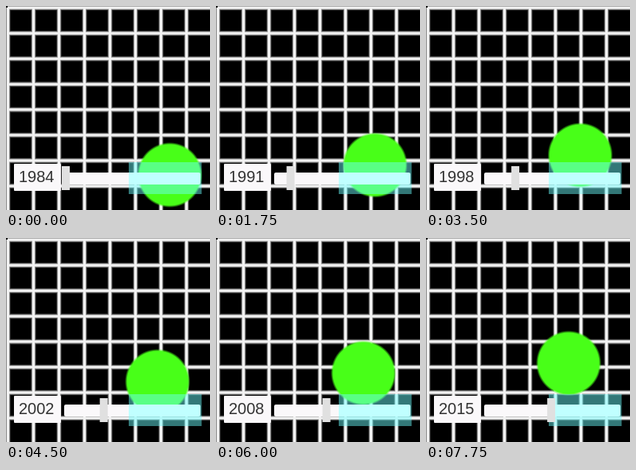
These frames come from a looping animation (256 by 256 pixels, 8000 ms). An HTML page with a canvas:

```html
<!DOCTYPE html>
<html lang="en">
<head>
<meta charset="utf-8">
<title>Year slider</title>
<style>
  html, body { margin: 0; width: 100%; height: 100%; overflow: hidden; background: #000; }
  canvas { display: block; width: 256px; height: 256px; }
</style>
</head>
<body>
<canvas id="stage" width="256" height="256"></canvas>
<script>
const ctx = document.getElementById('stage').getContext('2d');
const STEP_MS = 250, STEPS = 32, FIRST_YEAR = 1984;

function box(color, x, y, w, h) {
  ctx.fillStyle = color;
  ctx.fillRect(x, y, w, h);
}

function bar(color, x, y, w, h, radii) {
  ctx.fillStyle = color;
  ctx.beginPath();
  ctx.roundRect(x, y, w, h, radii);
  ctx.fill();
}

function gridLines(color, width) {
  ctx.strokeStyle = color;
  ctx.lineWidth = width;
  ctx.beginPath();
  for (let i = 0; i < 8; i++) {
    const x = 2.5 + i * 32, y = 2.3 + i * 31.95;
    ctx.moveTo(x, 2);
    ctx.lineTo(x, 256);
    ctx.moveTo(2, y);
    ctx.lineTo(256, y);
  }
  ctx.stroke();
}

function softDisc(x, y, radius, blur) {
  const fade = ctx.createRadialGradient(x, y, radius - blur, x, y, radius + blur);
  fade.addColorStop(0, 'rgb(72, 255, 24)');
  fade.addColorStop(1, 'rgba(72, 255, 24, 0)');
  ctx.fillStyle = fade;
  ctx.fillRect(x - 50, y - 50, 100, 100);
}

function draw(step) {
  box('#000', 0, 0, 256, 256);

  // Stacked strokes give the lines soft edges
  gridLines('#303030', 6.6);
  gridLines('#949494', 4.8);
  gridLines('#f2f2f2', 3);

  softDisc(205.5 - 0.855 * step, 212 - 1.77 * step, 39.5, 1.5);

  // Slider track with its highlighted range
  box('rgba(110, 255, 255, 0.47)', 154, 196, 91.5, 40);
  bar('#faf8fa', 73, 209, 82, 15, [2, 0, 0, 2]);
  bar('#c0ffff', 154, 209, 90, 15, [0, 2, 2, 0]);

  box('#e0e0e0', 70 + 2.65 * step, 201, 10, 30);

  bar('#faf8fa', 10, 198, 59, 34, 1);
  ctx.fillStyle = '#333';
  ctx.font = '20px "Liberation Sans", Arial, sans-serif';
  ctx.fillText(FIRST_YEAR + step, 16, 221);
}

function frame(now) {
  draw(Math.floor(now / STEP_MS) % STEPS);
  requestAnimationFrame(frame);
}

draw(0);
requestAnimationFrame(frame);
</script>
</body>
</html>
```
